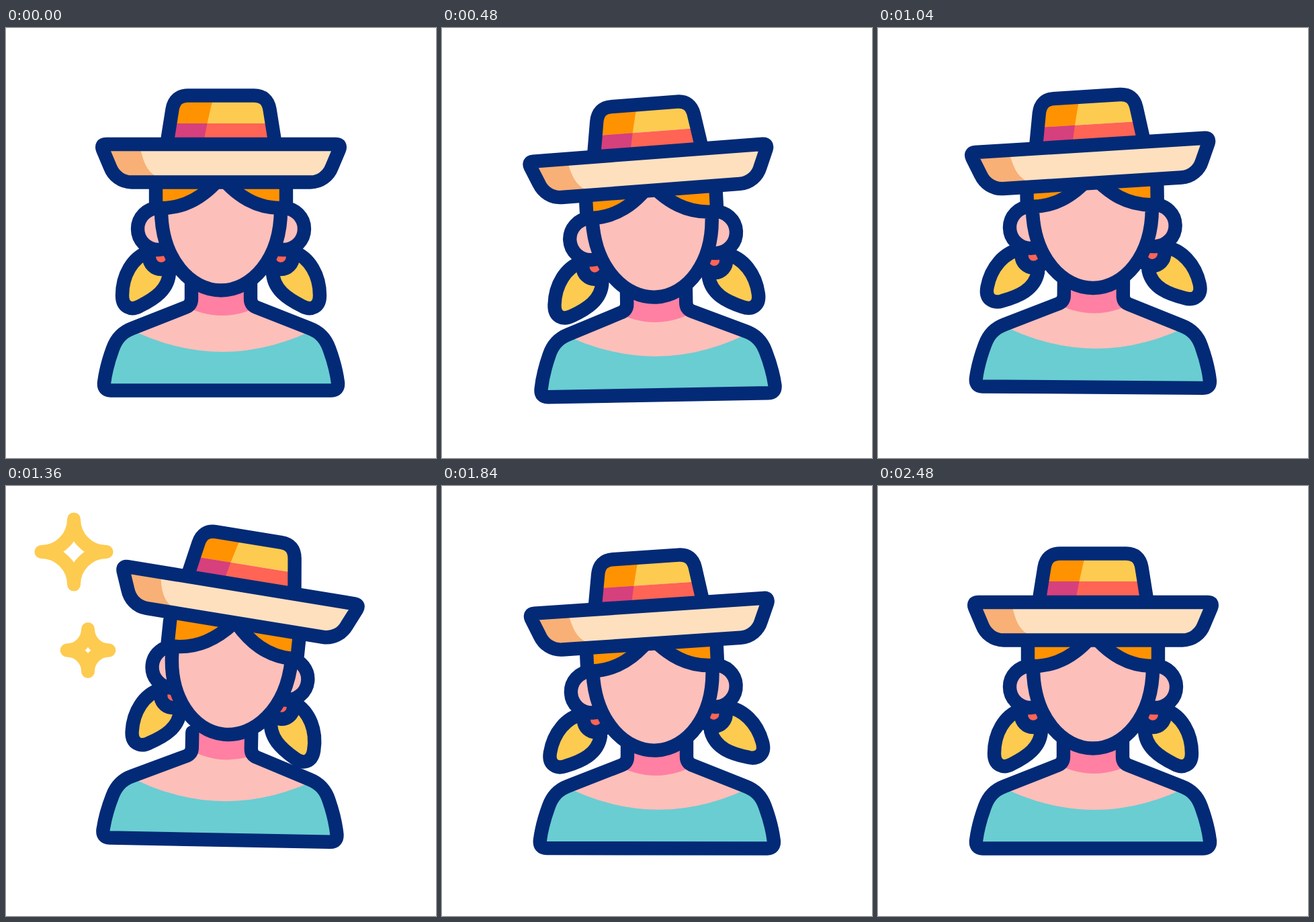
An HTML page for the animation above (2600 ms loop, 640x640 px).

```html
<!DOCTYPE html>
<html lang="en">
<head>
<meta charset="utf-8">
<title>Woman in a hat</title>
<style>
  html, body { margin: 0; width: 100%; height: 100%; overflow: hidden; background: #fff; }
  svg { display: block; width: 100vw; height: 100vh; }
  .line { stroke: #032a76; stroke-width: 20.4; stroke-linejoin: round; stroke-linecap: round; }
  .spark { fill: none; stroke: #fdcb50; stroke-linejoin: round; }
  .skin { fill: #fdbfba; }
  .gold { fill: #fdcb50; }
  .none { fill: none; }
</style>
</head>
<body>
<svg viewBox="0 0 640 640">
  <defs>
    <path id="torso" d="M276 380V403Q276 412 268 415.5L188 447C172 453 164 463 159 477C152 496 148 512 146 528Q145 539.5 156 539.5H484Q495 539.5 494 528C492 512 488 496 481 477C476 463 468 453 452 447L372 415.5Q364 412 364 403V380"/>
    <path id="crown" d="M240 168L247.5 121Q251 100.5 271 100.5H369Q389 100.5 392.5 121L400 168"/>
    <path id="brim" d="M149 173Q141 173 144 181L155 207C160 220 172 229.5 187 229.5H453C468 229.5 480 220 485 207L496 181Q499 173 491 173Z"/>
    <clipPath id="inTorso"><use href="#torso"/></clipPath>
    <clipPath id="inCrown"><use href="#crown"/></clipPath>
    <clipPath id="inBrim"><use href="#brim"/></clipPath>
  </defs>

  <path id="sparkBig" class="spark"/>
  <path id="sparkSmall" class="spark"/>

  <g id="body">
    <g clip-path="url(#inTorso)">
      <use href="#torso" class="skin"/>
      <path id="shade" fill="#ff80a2" d="M255 350V408Q322 448 388 408V350Z"/>
      <path fill="#69cdd2" d="M130 442H172Q322 522 472 442H510V545H130Z"/>
    </g>
    <use href="#torso" class="line none"/>
  </g>

  <g id="head">
    <g id="left"></g>
    <g transform="translate(640 0) scale(-1 1)"><g id="right"></g></g>

    <path class="skin" d="M231 225V270C231 345 275 390.5 320 390.5S409 345 409 270V225Z"/>
    <path fill="#ff9200" d="M223 225H318C295 250 268 268 231 268H223Z M417 225H322C345 250 372 268 409 268H417Z"/>
    <path class="line none" d="M231 268V270C231 345 275 390.5 320 390.5S409 345 409 270V268M223 230V268H231C268 268 295 250 318 224M417 230V268H409C372 268 345 250 322 224"/>

    <g id="hat">
      <g clip-path="url(#inCrown)">
        <path class="gold" d="M230 90H410V142H230Z"/>
        <path fill="#ff6455" d="M230 142H410V175H230Z"/>
        <path fill="#ff9200" d="M230 90H314Q306 111 304 122L299.5 142H230Z"/>
        <path fill="#d6407c" d="M230 142H299.5L293 175H230Z"/>
      </g>
      <use href="#crown" class="line none"/>
      <use href="#brim" fill="#fee0be"/>
      <path clip-path="url(#inBrim)" fill="#f8b076" d="M130 170H196L201 184C205 199 209 212 222 220L226 235H130Z"/>
      <use href="#brim" class="line none"/>
    </g>
  </g>
</svg>
<script>
  const LOOP = 2600, STEP = 40;
  const $ = id => document.getElementById(id);
  const move = (id, value) => $(id).setAttribute('transform', value);
  const ease = u => (1 - Math.cos(Math.PI * u)) / 2;

  // Eased value through [time, value] keys.
  function track(t, ...keys) {
    if (t <= keys[0][0]) return keys[0][1];
    for (let i = 1; i < keys.length; i++) {
      const [t0, a] = keys[i - 1], [t1, b] = keys[i];
      if (t < t1) return a + (b - a) * ease((t - t0) / (t1 - t0));
    }
    return keys[keys.length - 1][1];
  }

  // Pigtail, earring and ear; the other side is mirrored.
  for (const side of ['left', 'right']) {
    $(side).innerHTML = `
      <path id="${side}Tail" class="line gold" d="M212 333C188 342 173 368 173 398C173 416 186 421 199 414C221 403 243 389 243 362Z"/>
      <circle class="line" cx="231" cy="341" r="18" fill="#ff6455"/>
      <circle class="line skin" cx="227" cy="299" r="31"/>`;
  }

  function sparkle(id, x, y, r) {
    const arc = `A${r} ${r} 0 0 0 `;
    const el = $(id);
    el.setAttribute('d', r < 0.5 ? '' :
      `M${x} ${y - r}${arc}${x + r} ${y}${arc}${x} ${y + r}${arc}${x - r} ${y}${arc}${x} ${y - r}Z`);
    el.setAttribute('stroke-width', Math.min(20, r * 2));
  }

  function sparkSize(t) {
    if (t < 1050 || t > 1820) return 0;
    return t < 1560
      ? 1 - Math.pow(1 - (t - 1050) / 510, 2.3)
      : 1 - Math.pow((t - 1560) / 260, 2);
  }

  function draw(t) {
    const bodyX = track(t, [200, 0], [760, 3], [1220, -1.7], [2000, 0]);
    const bodyY = track(t, [200, 0], [760, 13.5], [1220, -14], [2000, 1.3], [2440, 0]);
    const bodyTurn = track(t, [200, 0], [760, -2.05], [1180, 1.25], [1960, 0]);
    const headX = track(t, [760, 0], [1340, 2], [1900, 0]);
    const headY = track(t, [200, 0], [760, 20], [1280, -22], [1920, 4], [2440, 0]);
    const headTurn = track(t, [240, 0], [760, -7], [1340, 6], [1900, -3], [2440, 0]);
    const hatTurn = track(t, [280, 0], [680, -2.5], [1000, -2.9], [1360, 3.3], [1860, -1.1], [2440, 0]);
    const spread = track(t, [280, 0], [760, 12.5], [960, 13], [1400, -3.3], [1880, 12.5], [2440, 0]);
    const tuck = track(t, [960, 0], [1380, 7.7], [1860, 1], [2440, 0]);

    move('body', `translate(${bodyX} ${bodyY}) rotate(${bodyTurn} 320 529)`);
    move('shade', `translate(0 ${headY - bodyY}) rotate(${(headTurn - bodyTurn) * 0.7} 320 409)`);
    move('head', `translate(${headX} ${headY}) rotate(${headTurn} 320 409)`);
    move('hat', `translate(${hatTurn * 0.6} ${hatTurn * -1.8}) rotate(${hatTurn} 320 183)`);
    for (const side of ['left', 'right']) {
      move(side, `translate(${tuck} 0)`);
      move(side + 'Tail', `rotate(${spread} 222 335)`);
    }

    const size = sparkSize(t);
    sparkle('sparkBig', 101, 98, 55 * size);
    sparkle('sparkSmall', 122, 244.5, 35.5 * size);
  }

  const start = performance.now();
  function frame() {
    const t = (performance.now() - start) % LOOP;
    draw(Math.floor(t / STEP) * STEP);
    requestAnimationFrame(frame);
  }
  frame();
</script>
</body>
</html>
```
